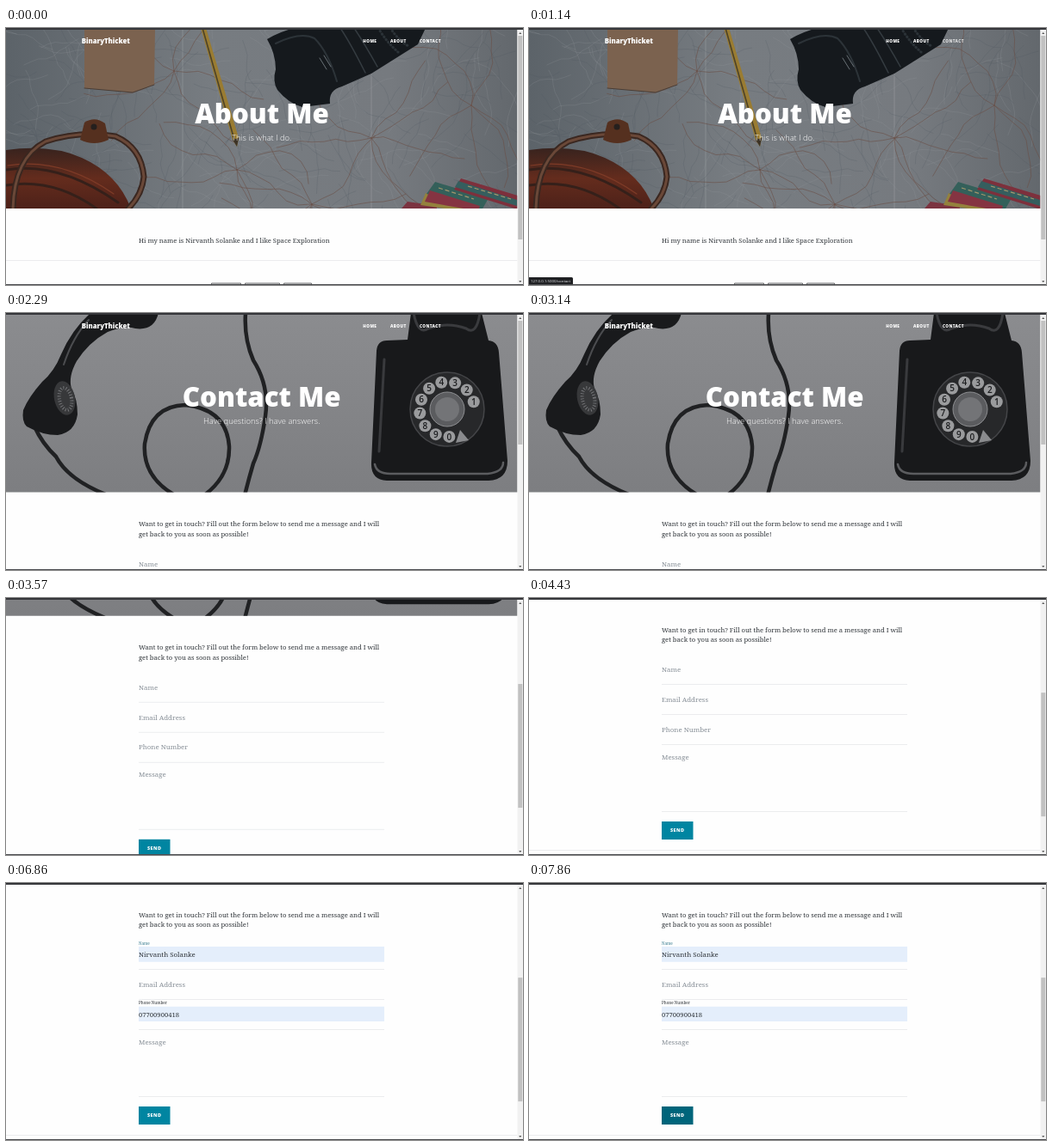
Write an HTML page that moves like this. It is 600 px wide and 299 px high and loops after 8 s.

```html
<!DOCTYPE html>
<html lang="en">
<head>
<meta charset="utf-8">
<title>Contact form walkthrough</title>
<style>
  html, body { margin: 0; width: 100%; height: 100%; overflow: hidden; background: #fff; }
  svg { display: block; }
  text { font-family: "Open Sans", "Noto Sans", sans-serif; white-space: pre; }
  .serif { font-family: "Noto Serif", serif; font-size: 7.65px; fill: #2f3439; }
  .field { font-size: 7.9px; }
  .hint { fill: #868e96; }
  .label { font-size: 4.57px; }
  .brand { font-size: 7.8px; font-weight: 800; fill: #fff; }
  .link { font-size: 4.7px; font-weight: 800; letter-spacing: .39px; fill: #fff; }
  .title { font-size: 31.25px; font-weight: 800; fill: #fff; text-anchor: middle; }
  .sub { font-size: 9.4px; font-weight: 300; fill: #fff; text-anchor: middle; }
  .send { font-size: 5.5px; font-weight: 800; letter-spacing: .39px; fill: #fff; }
  .menu { font-size: 4.6px; fill: #dadce0; }
  .digit { font-size: 10px; font-weight: 600; fill: #1b1c1e; text-anchor: middle; }
  .rule { stroke: #e4e6e8; stroke-width: .7; }
  .line { fill: none; stroke-linecap: round; stroke-linejoin: round; }
</style>
</head>
<body>
<svg width="600" height="299" viewBox="0 0 600 299">
  <defs>
    <linearGradient id="mapTone">
      <stop offset="0" stop-color="#5c6369"/><stop offset=".4" stop-color="#777c81"/>
      <stop offset=".75" stop-color="#767a7f"/><stop offset="1" stop-color="#63686d"/>
    </linearGradient>
    <linearGradient id="deskTone" x2="0" y2="1">
      <stop offset="0" stop-color="#8b8c8f"/><stop offset="1" stop-color="#7d7e81"/>
    </linearGradient>
    <linearGradient id="bagTone" x2="0" y2="1">
      <stop offset="0" stop-color="#38231e"/><stop offset=".5" stop-color="#642c1d"/><stop offset="1" stop-color="#4d2119"/>
    </linearGradient>
    <clipPath id="aboutClip"><path d="M0 0H593.5V210H0z"/></clipPath>
    <clipPath id="contactClip"><path d="M0 0H593.5V208.5H0z"/></clipPath>
  </defs>
  <rect width="600" height="299" fill="#fefefe"/>

  <g id="about">
    <g clip-path="url(#aboutClip)">
      <rect width="594" height="210" fill="url(#mapTone)"/>
      <g id="roads" class="line"/>
      <!-- notebook -->
      <path d="M91 0H173L172 66 147 75 91 70z" fill="#7b624f"/>
      <path d="M91 70 147 75 172 66" class="line" stroke="#4a3d35"/>
      <!-- pencil -->
      <path d="M226 0H232L270 128 268 138 263 130z" fill="#9a7c31"/>
      <path d="M228 0 265 130" class="line" stroke="#4c4229" stroke-width="1.6"/>
      <path d="M263 130 270 128 268 138z" fill="#3c3327"/>
      <!-- lens -->
      <path d="M303 13Q318 4 335 0H487L478 19 424 53 390 68Q374 72 376 88L344 92Q328 88 315 72 309 62 313 48 313 30 303 13z" fill="#15191d"/>
      <g class="line">
        <path d="M313 18Q342 4 358 12 374 28 384 62" stroke="#2c3338" stroke-width="2"/>
        <path d="M388 0Q400 18 417 52M404 0Q416 18 431 45" stroke="#343b40" stroke-width="1.5"/>
        <path d="M432 0Q442 17 455 28M446 0Q456 15 467 21" stroke="#2b3237" stroke-width="3" stroke-dasharray=".5 3.5"/>
        <path d="M364 35 372 48M369 32 377 45" stroke="#697176" stroke-width="1"/>
      </g>
      <!-- bag -->
      <path d="M0 142Q52 135 88 151 130 170 145 210H0z" fill="url(#bagTone)"/>
      <g class="line">
        <path d="M0 165Q62 155 130 203M0 183Q55 174 105 210" stroke="#35201a" stroke-width="3"/>
        <path d="M2 160Q64 150 125 193" stroke="#7e3b27" stroke-width="1.2"/>
        <path d="M8 212Q9 151 46 132 86 119 127 126 157 139 160 173 158 194 142 210" stroke="#3a2720" stroke-width="7"/>
        <path d="M8 212Q9 151 46 132 86 119 127 126 157 139 160 173 158 194 142 210" stroke="#6a4838" stroke-width="3"/>
      </g>
      <path d="M91 110Q103 102 115 111L119 130Q102 138 86 130z" fill="#55301f"/>
      <circle cx="102" cy="115" r="3.5" fill="#25201e"/>
      <!-- books -->
      <path d="M459 210 466 202 500 207 500 210z" fill="#7b3340"/>
      <path d="M481 206 487 192 548 209 545 215z" fill="#94813d"/>
      <path d="M488 193 498 179 560 198 552 212z" fill="#34605a"/>
      <path d="M486 202 492 189 550 207 548 213z" fill="#853442"/>
      <path d="M520 188 528 175 597 196V212z" fill="#7d303c"/>
      <path d="M521 185 525 178 593 200V207z" fill="#355e5e"/>
      <path d="M536 184 586 199M502 186 543 199" stroke="#a3966c" stroke-width="1.2" stroke-dasharray="5 3"/>
    </g>
    <text class="title" x="297" y="111">About Me</text>
    <text class="sub" x="296.7" y="130.5">This is what I do.</text>
    <text class="serif" x="154" y="249.6">Hi my name is Nirvanth Solanke and I like Space Exploration</text>
    <path class="rule" d="M0 270.5H593.5"/>
    <path d="M238.5 300V297H272.5V300M277.5 300V297H317.5V300M322.5 300V297H354.5V300" fill="#efefef" stroke="#55575a" stroke-width=".9"/>
  </g>

  <g id="contact">
    <g clip-path="url(#contactClip)">
      <rect width="594" height="209" fill="url(#deskTone)"/>
      <g class="line" stroke="#202123" stroke-width="4.5">
        <path d="M33 132Q42 152 58 167 72 194 118 212"/>
        <path d="M278 0Q276 30 287 55 306 85 301 120 296 155 287 175 282 192 277 212"/>
        <path d="M196 212Q158 190 161 152 168 108 208 107 256 112 259 155 260 190 230 212"/>
      </g>
      <!-- handset -->
      <path d="M98 0Q76 20 64 48 56 68 42 80 26 98 20 113 18 126 24 132 42 142 60 142 80 139 83 118 83 100 76 88 72 74 82 56 96 34 118 22 138 14 150 18 172 21 177 0z" fill="#191a1c"/>
      <path d="M96 8Q78 27 67 60" class="line" stroke="#4b4c4f" stroke-width="2"/>
      <ellipse cx="68" cy="99" rx="12" ry="20" transform="rotate(-12 68 99)" fill="#37383a"/>
      <ellipse cx="69" cy="100" rx="7" ry="13" transform="rotate(-12 69 100)" fill="none" stroke="#717275" stroke-width="4" stroke-dasharray="1 2"/>
      <!-- rotary phone -->
      <path d="M470 0H552L560 32Q571 33 572 46L582 172Q582 194 560 195H442Q423 194 424 174L430 44Q431 32 442 32L466 31z" fill="#18191b"/>
      <path d="M428 176Q430 187 446 187H559Q577 185 577 174" class="line" stroke="#5b5c5f" stroke-width="2.5"/>
      <path d="M473 0Q478 26 490 18 512 10 534 18 546 27 550 0" class="line" stroke="#3a3b3e" stroke-width="3"/>
      <path d="M439 54 433 161" class="line" stroke="#393a3d" stroke-width="3"/>
      <circle cx="512" cy="112" r="43" fill="#27282a" stroke="#444548" stroke-width="1.5"/>
      <g id="dial"/>
      <circle cx="512" cy="112" r="20" fill="#5b5c5f" stroke="#8d8e91"/>
      <circle cx="512" cy="112" r="14" fill="#737477"/>
      <path d="M522 151 527 136 537 148z" fill="#8a8b8e"/>
    </g>
    <text class="title" x="296.7" y="109">Contact Me</text>
    <text class="sub" x="296.7" y="128.7">Have questions? I have answers.</text>
    <text class="serif" x="154" y="248">Want to get in touch? Fill out the form below to send me a message and I will</text>
    <text class="serif" x="154" y="259.7">get back to you as soon as possible!</text>

    <g transform="translate(0 208.5)">
      <path class="rule" d="M154 100.5H439M154 135.5H439M154 170.5H439M154 248.5H439M0 293.5H593.5"/>
      <g id="empty">
        <text class="serif field hint" x="154" y="86">Name</text>
        <text class="serif field hint" x="154" y="155.7">Phone Number</text>
      </g>
      <text class="serif field hint" x="154" y="120.8">Email Address</text>
      <text class="serif field hint" x="154" y="187.7">Message</text>
      <g id="filled">
        <path d="M154 74H439V91.7H154zM154 143.7H439V161H154z" fill="#e4eefb"/>
        <text class="serif field" x="154" y="86">Nirvanth Solanke</text>
        <text class="serif" x="154" y="155.5">07700900418</text>
        <g id="labels">
          <text class="serif label" x="154" y="71.5" style="fill:#3d7f92">Name</text>
          <text class="serif label" x="154" y="141">Phone Number</text>
        </g>
      </g>
      <rect id="button" x="154" y="260" width="36.5" height="21"/>
      <text class="send" x="164" y="272.4">SEND</text>
      <g id="menu">
        <path d="M154.5 78V88" stroke="#333" stroke-width=".8"/>
        <rect x="154" y="91.5" width="75.5" height="45.3" rx="1.5" fill="#292a2d"/>
        <path d="M154 121H229.5" stroke="#45474b" stroke-width=".6"/>
        <text class="menu" x="158.5" y="103.2" style="font-weight:600;fill:#fff">Nirvanth Solanke</text>
        <text class="menu" x="158.5" y="111.7">077009 00418</text>
        <text class="menu" x="158.5" y="130.7">Manage...</text>
      </g>
    </g>
  </g>

  <g id="nav">
    <text class="brand" x="87.7" y="17.8">BinaryThicket</text>
    <text class="link" x="414.3" y="16.8">HOME</text>
    <text class="link" x="446" y="16.8">ABOUT</text>
    <text class="link" id="contactLink" x="480" y="16.8">CONTACT</text>
  </g>

  <g id="ring">
    <circle r="3.2" fill="#e4e4e4" stroke="#8f8f8f" stroke-width="1.2"/>
    <circle r="1.4" fill="#fff" stroke="#999" stroke-width=".6"/>
  </g>
  <g id="status">
    <path d="M0 290H49.5Q51 290 51 291.5V299H0z" fill="#1f2023"/>
    <text x="2" y="296.2" font-size="4.35" fill="#e8eaed">127.0.0.1:5000/contact</text>
  </g>
  <path d="M593.5 2H600V299H593.5z" fill="#f1f1f1"/>
  <rect id="thumb" x="594.3" y="9" width="5" fill="#c1c1c1"/>
  <path d="M595.2 7 596.8 5 598.4 7zM595.2 294 596.8 296 598.4 294z" fill="#555"/>
  <path d="M0 0H600V2H0z" fill="#35363a"/>
  <path d="M0 298H600V299H0z" fill="#4a4b4e"/>
</svg>
<script>
const LOOP = 8000;
const LINK_HOVER = 700, PAGE_SWITCH = 2290, CLICK = 5860, FILL = 6570, SEND_HOVER = 7430;
const $ = id => document.getElementById(id);
const clamp = v => Math.min(1, Math.max(0, v));
const ramp = (t, start, length) => clamp((t - start) / length);
const show = (id, on) => $(id).style.display = on ? '' : 'none';

let seed = 11;
const random = () => (seed = seed * 16807 % 2147483647) / 2147483647;

// A wandering line that starts at (x, y).
function road(x, y, heading, step, style) {
  let d = `M${x} ${y}`;
  for (let i = 0; i < 8; i++) {
    heading += (random() - .5) * .9;
    x += Math.cos(heading) * step;
    y += Math.sin(heading) * step;
    d += `L${x.toFixed(1)} ${y.toFixed(1)}`;
  }
  return `<path d="${d}" ${style}/>`;
}

function drawRoads() {
  let out = '<path d="M205 0V210M424 40V210" stroke="#95999b" opacity=".3" stroke-width="2"/>';
  for (let i = 0; i < 220; i++) {
    const color = i % 2 ? '#94989b' : '#4f575d';
    out += road(random() * 594, random() * 210, random() * 6.28, 9, `stroke="${color}" stroke-width=".5" opacity=".45"`);
  }
  for (const [x, y] of [[424, 128], [355, 205], [268, 165], [195, 50], [540, 90]]) {
    for (let i = 0; i < 7; i++) {
      out += road(x, y, i * .9 + random() * .4, 14, 'stroke="#6b4f47" stroke-width=".8" opacity=".75"');
    }
  }
  $('roads').innerHTML = out;
}

function drawDial() {
  $('dial').innerHTML = [...'1234567890'].map((digit, i) => {
    const a = -(16 + 28.7 * i) * Math.PI / 180;
    const x = 512 + 32 * Math.cos(a), y = 112 + 32 * Math.sin(a);
    return `<circle cx="${x}" cy="${y}" r="7" fill="#9a9b9d"/><text class="digit" x="${x}" y="${y + 3.6}">${digit}</text>`;
  }).join('');
}

function scrollAt(t) {
  return 187.5 * ramp(t, 3200, 370) + 21 * (1 - (1 - ramp(t, 3570, 200)) ** 2);
}

function mix(from, to, p) {
  return `rgb(${from.map((v, i) => Math.round(v + (to[i] - v) * p))})`;
}

function render(t) {
  const onContact = t >= PAGE_SWITCH;
  const scroll = scrollAt(t);
  const filled = t >= FILL;
  show('about', !onContact);
  show('contact', onContact);
  show('status', t >= LINK_HOVER && !onContact);
  $('contactLink').style.opacity = onContact ? 1 : 1 - .25 * ramp(t, LINK_HOVER, 150);
  for (const id of ['contact', 'nav']) $(id).setAttribute('transform', `translate(0 ${-scroll})`);
  $('thumb').setAttribute('y', 9 + scroll * .485);
  $('thumb').setAttribute('height', onContact ? 144 : 237);

  show('menu', t >= CLICK && !filled);
  show('empty', !filled);
  show('filled', filled);
  $('labels').style.opacity = ramp(t, FILL, 200);
  $('labels').setAttribute('transform', `translate(0 ${4 * (1 - ramp(t, FILL, 200))})`);
  $('button').setAttribute('fill', mix([0, 133, 161], [0, 101, 123], ramp(t, SEND_HOVER, 150)));

  show('ring', t >= 5140 && t < 6430);
  $('ring').setAttribute('transform', t < CLICK ? 'translate(171.5 67.5)' : 'translate(150.5 57)');
}

function frame(now) {
  render(now % LOOP);
  requestAnimationFrame(frame);
}

drawRoads();
drawDial();
render(0);
requestAnimationFrame(frame);
</script>
</body>
</html>
```
